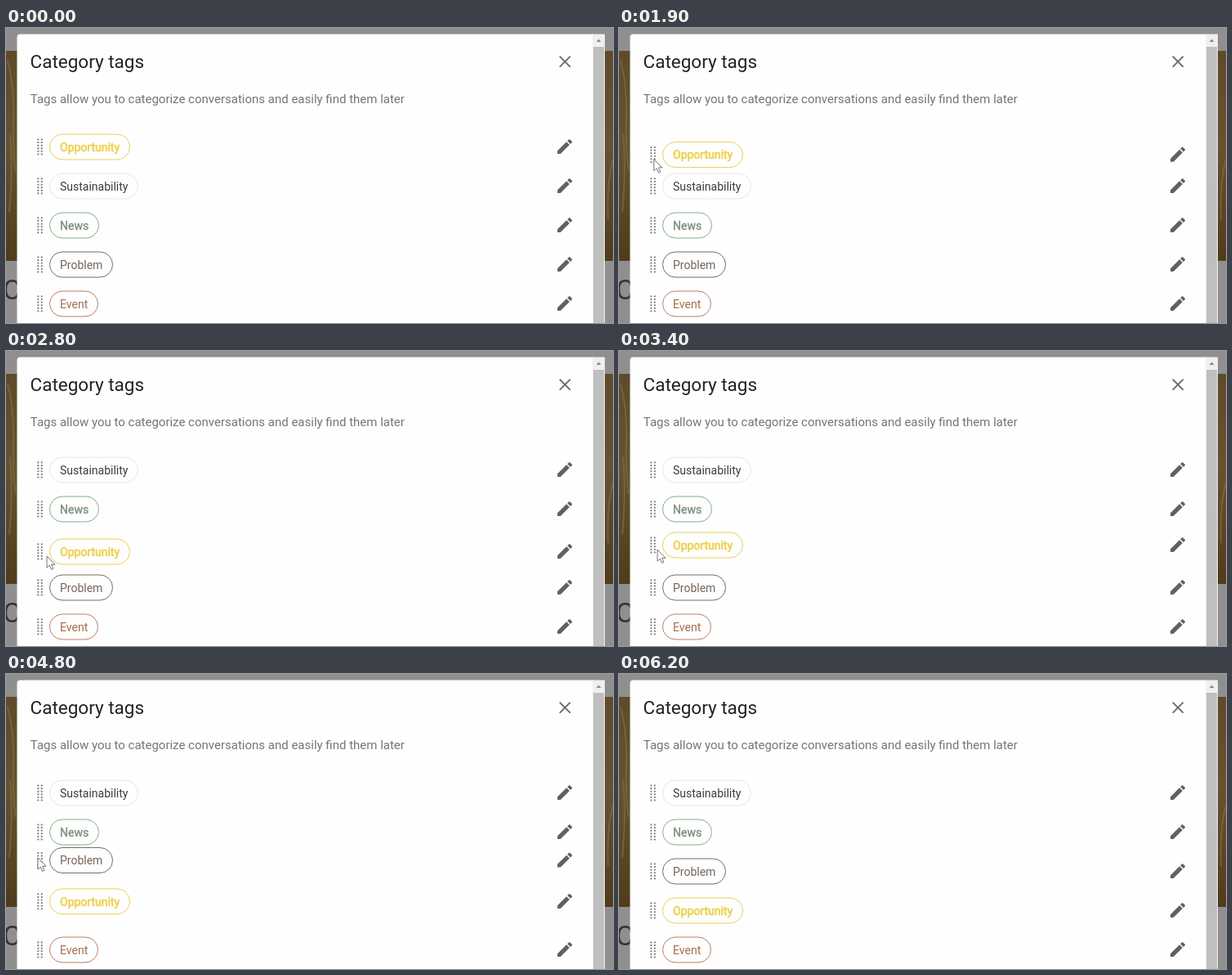
Recreate the animation shown at these times as an HTML page. Size 743 by 361 pixels, loop 6600 ms.

```html
<!DOCTYPE html>
<html lang="en">
<head>
<meta charset="utf-8">
<title>Category tags</title>
<style>
html, body { margin: 0; width: 100%; height: 100%; overflow: hidden; background: #8f8f8f; }
svg { display: block; width: 743px; height: 361px; }
text { font-family: Roboto, sans-serif; }
</style>
</head>
<body>
<svg viewBox="0 0 743 361" xmlns="http://www.w3.org/2000/svg">
  <defs>
    <linearGradient id="photo" x1="0" y1="0" x2="0" y2="1">
      <stop offset="0" stop-color="#5f4b29"/>
      <stop offset=".45" stop-color="#66522f"/>
      <stop offset="1" stop-color="#503c1a"/>
    </linearGradient>
    <g id="grip" fill="#777"></g>
    <path id="pencil" fill="#616161" d="M3 17.25V21h3.75L17.81 9.94l-3.75-3.75L3 17.25zM20.71 7.04a.996.996 0 0 0 0-1.41l-2.34-2.34a.996.996 0 0 0-1.41 0l-1.83 1.83 3.75 3.75 1.83-1.83z"/>
  </defs>

  <rect width="743" height="361" fill="#8f8f8f"/>
  <rect y="28" width="743" height="257" fill="url(#photo)"/>
  <path d="M2 40Q10 70 9 110T12 175M5 130Q9 170 4 225M743 160Q735 190 737 235" fill="none" stroke="#85714a" stroke-width="2" opacity=".6"/>
  <text x="-4" y="332" font-size="34" fill="#333">C</text>

  <path d="M13.5 361V11.5a4 4 0 0 1 4-4H719V361z" fill="#fefefe"/>
  <rect x="718" y="7.5" width="15" height="354" fill="#f0f0f0"/>
  <path d="M722.5 17l3-3.5 3 3.5z" fill="#8a8a8a"/>
  <rect x="719" y="23" width="13" height="338" fill="#bfbfbf"/>

  <text x="29.5" y="48.5" font-size="22.5" fill="#222">Category tags</text>
  <text x="29.8" y="91.6" font-size="15" fill="#757575">Tags allow you to categorize conversations and easily find them later</text>
  <path d="M677.7 34.7l13 13m0-13l-13 13" stroke="#666" stroke-width="1.8"/>

  <g id="rows"></g>
  <path id="cursor" d="M0 0V14.2L3.3 11.2 5.5 16.4 7.8 15.4 5.6 10.3H10z" fill="#fff" stroke="#666" stroke-width=".9"/>
</svg>
<script>
const LOOP = 6600, STEP = 100, SLIDE = 250;
const TOP = 145.5, PITCH = 48;
const $ = id => document.getElementById(id);

// A tag starts in one slot and slides to another at swapAt;
// a dragged tag follows the pointer from grab to drop, then settles.
const tags = [
  { name: 'Sustainability', w: 108, ink: '#3c3c3c', line: '#e6e6e6', slot: 1, to: 0, swapAt: 2040 },
  { name: 'News', w: 60, ink: '#7a8e7b', line: '#7fb086', bold: .35, slot: 2, to: 1, swapAt: 2350 },
  { name: 'Event', w: 59, ink: '#a56c49', line: '#bb7f68', slot: 4 },
  { name: 'Opportunity', w: 98, ink: '#efd04c', line: '#ead254', bold: .7, slot: 0,
    drag: { grab: 1500, drop: 3900, slot: 2, hold: 5.5 }, to: 3, swapAt: 4630 },
  { name: 'Problem', w: 77, ink: '#73645c', line: '#776c68', slot: 3,
    drag: { grab: 4500, drop: 4800, slot: 2, hold: -3 } }
];

// Pointer moves, each starting where the last one ended.
const enter = { x: 150, y: 345 };
const moves = [
  { from: 600, to: 1200, x: 43, y: 157 },
  { from: 1400, to: 1500, x: 42, y: 151 },
  { from: 1700, to: 2700, x: 50, y: 251 },
  { from: 3300, to: 3400, x: 47, y: 243 },
  { from: 3900, to: 4200, x: 45, y: 239 },
  { from: 4300, to: 4500, x: 41, y: 286 },
  { from: 4500, to: 4800, x: 39, y: 225 },
  { from: 5400, to: 5700, x: 140, y: 361 }
];

const mix = (a, b, k) => a + (b - a) * k;
const ease = k => .5 - .5 * Math.cos(Math.PI * Math.min(1, Math.max(0, k)));
const slotY = slot => TOP + PITCH * slot;

function pointer(t) {
  return moves.reduce((p, m) => {
    const k = ease((t - m.from) / (m.to - m.from));
    return { x: mix(p.x, m.x, k), y: mix(p.y, m.y, k) };
  }, enter);
}

function rowY({ slot, drag, to, swapAt }, t) {
  let y = slotY(slot);
  if (drag && t >= drag.grab) {
    const held = pointer(Math.min(t, drag.drop)).y - drag.hold;
    y = mix(held, slotY(drag.slot), ease((t - drag.drop) / SLIDE));
  }
  return swapAt ? mix(y, slotY(to), ease((t - swapAt) / SLIDE)) : y;
}

function buildGrip() {
  let dots = '';
  for (let r = 0; r < 6; r++)
    for (let c = 0; c < 2; c++)
      dots += `<rect x="${38.4 + c * 4.4}" y="${r * 3.6 - 10}" width="1.9" height="1.9"/>`;
  $('grip').innerHTML = dots;
}

const rowMarkup = ({ name, w, ink, line, bold = 0 }) => `<g>
  <use href="#grip"/>
  <rect x="53.5" y="-15.5" width="${w}" height="31" rx="15.5" fill="none" stroke="${line}"/>
  <text x="66" y="5.2" font-size="14" fill="${ink}" stroke="${ink}" stroke-width="${bold}">${name}</text>
  <use href="#pencil" x="672" y="-12.4"/>
</g>`;

buildGrip();
$('rows').innerHTML = tags.map(rowMarkup).join('');
const rows = [...$('rows').children];

function draw(now) {
  const t = Math.floor(now % LOOP / STEP) * STEP;
  const { x, y } = pointer(t);
  tags.forEach((tag, i) => rows[i].setAttribute('transform', `translate(0 ${rowY(tag, t)})`));
  $('cursor').setAttribute('transform', `translate(${x} ${y})`);
  $('cursor').setAttribute('visibility', t >= 600 && t < 5700 ? 'visible' : 'hidden');
}

function tick() {
  draw(performance.now());
  requestAnimationFrame(tick);
}
tick();
</script>
</body>
</html>
```
